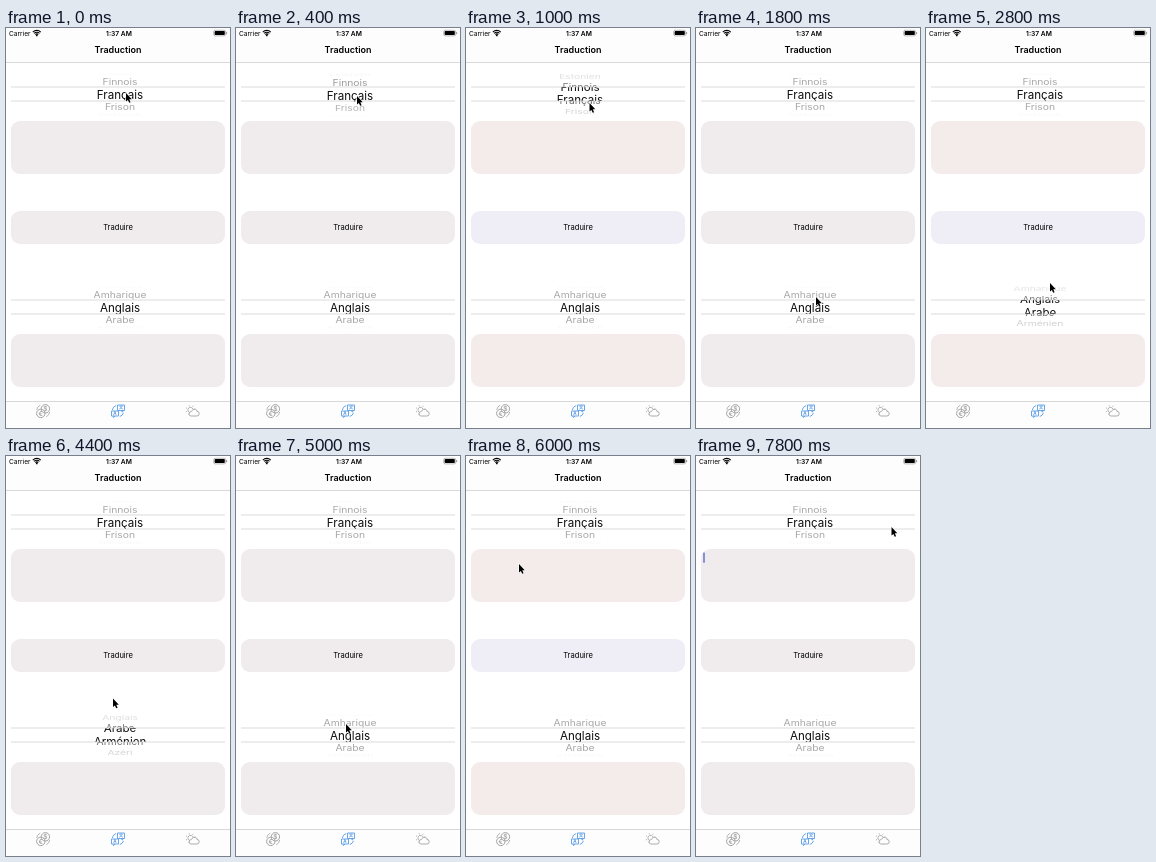
Animation, 224 px wide and 400 px high, one loop 8 s. Source, as an HTML page with a canvas:

```html
<!DOCTYPE html>
<html lang="fr">
<head>
<meta charset="utf-8">
<title>Traduction</title>
<style>
  html, body { margin: 0; width: 100%; height: 100%; overflow: hidden; background: #fff; }
  canvas { display: block; width: 224px; height: 400px; }
</style>
</head>
<body>
<canvas id="stage"></canvas>
<script>
const W = 224, H = 400, LOOP = 8000, STEP = 200;
const canvas = document.getElementById('stage');
const ctx = canvas.getContext('2d');
const dpr = window.devicePixelRatio || 1;
canvas.width = W * dpr;
canvas.height = H * dpr;

const GREY = '#a3a3a5', BLUE = '#5b9de6';
const FROM = ['Espéranto', 'Estonien', 'Finnois', 'Français', 'Frison', 'Gaélique', 'Galicien'];
const TO = ['Albanais', 'Allemand', 'Amharique', 'Anglais', 'Arabe', 'Arménien', 'Azéri', 'Basque'];

// Key points: [time, value, ...]
const MOUSE = [
  [0, 120, 65], [400, 121, 68], [1000, 123.5, 75], [1200, 124, 82], [1800, 120, 269],
  [2200, 122, 273], [2800, 124, 255], [3200, 124, 246], [3600, 116, 270],
  [4400, 107, 242.5], [5000, 110, 268], [5200, 110, 268], [6000, 53, 108],
  [6400, 53, 108], [7400, 195.5, 71], [8000, 195.5, 71]
];
const FROM_POS = [[0, 3], [200, 2.95], [1000, 2.57], [1400, 3], [8000, 3]];
const TO_POS = [
  [0, 3], [2000, 3], [2800, 3.62], [3200, 4], [3600, 4],
  [4400, 4.56], [5000, 3], [8000, 3]
];

function sample(keys, t) {
  let i = 1;
  while (i < keys.length - 1 && t >= keys[i][0]) i++;
  const a = keys[i - 1], b = keys[i];
  const p = Math.min(1, (t - a[0]) / (b[0] - a[0]));
  const e = p * p * (3 - 2 * p);
  return a.slice(1).map((v, k) => v + (b[k + 1] - v) * e);
}

function text(str, x, y, size, { weight = 400, color = '#000', align = 'center' } = {}) {
  ctx.font = `${weight} ${size}px Inter, Roboto, sans-serif`;
  ctx.textAlign = align;
  ctx.textBaseline = 'alphabetic';
  ctx.fillStyle = color;
  ctx.fillText(str, x, y);
}

function rect(x, y, w, h, color) {
  ctx.fillStyle = color;
  ctx.fillRect(x, y, w, h);
}

function box(x, y, w, h, r, color) {
  ctx.beginPath();
  ctx.roundRect(x, y, w, h, r);
  ctx.fillStyle = color;
  ctx.fill();
}

function stroke(color, width, draw) {
  ctx.beginPath();
  draw();
  ctx.strokeStyle = color;
  ctx.lineWidth = width;
  ctx.stroke();
}

function poly(points) {
  points.forEach(([x, y], i) => i ? ctx.lineTo(x, y) : ctx.moveTo(x, y));
}

function clipped(y, h, draw) {
  ctx.save();
  ctx.beginPath();
  ctx.rect(0, y, W, h);
  ctx.clip();
  draw();
  ctx.restore();
}

function rows(items, pos, cy, size, radius, inner) {
  items.forEach((name, i) => {
    const angle = (i - pos) * 0.6;
    if (Math.abs(angle) > 1.3) return;
    const c = Math.cos(angle);
    ctx.save();
    ctx.translate(114, cy + radius * Math.sin(angle));
    ctx.scale(1, c);
    ctx.globalAlpha = inner ? 0.95 : 0.62 * c ** 3;
    text(name, 0, size * 0.36, size);
    ctx.restore();
  });
}

// Dim drum outside the band, enlarged dark copy inside it
function picker(items, pos, cy) {
  const top = cy - 7.5, bottom = cy + 6.5;
  clipped(cy - 21, top - cy + 21, () => rows(items, pos, cy, 10.3, 22, false));
  clipped(bottom, 16, () => rows(items, pos, cy, 10.3, 22, false));
  clipped(top, bottom - top, () => rows(items, pos, cy, 11.6, 23, true));
  for (const y of [top, bottom]) rect(5, y - 0.3, 214, 0.6, '#c3c3c5');
}

function statusBar() {
  text('Carrier', 3, 7.5, 6.6, { align: 'left' });
  text('1:37 AM', 113, 7.5, 6.7, { weight: 600 });
  for (const r of [2, 3.8, 5.6])
    stroke('#000', 1.1, () => ctx.arc(30.8, 8, r, -Math.PI * 0.75, -Math.PI * 0.25));
  ctx.beginPath();
  ctx.arc(30.8, 7.4, 0.9, 0, 7);
  ctx.fillStyle = '#000';
  ctx.fill();
  stroke('#777', 0.5, () => ctx.roundRect(207.7, 2.3, 12, 5.6, 1.5));
  box(208.6, 3.1, 10.2, 4, 0.8, '#000');
  rect(220.3, 4.1, 0.8, 2, '#777');
}

function coinsIcon(x, y) {
  stroke(GREY, 1, () => ctx.arc(x + 2.2, y - 2.2, 4.2, 0, 7));
  stroke(GREY, 1, () => ctx.arc(x - 2.4, y + 2.4, 4.2, 0, 7));
  text('$', x + 2.2, y + 0.2, 6.5, { weight: 600, color: GREY });
  text('€', x - 2.4, y + 4.8, 6.5, { weight: 600, color: GREY });
  stroke(GREY, 0.8, () => {
    ctx.arc(x, y, 6.6, Math.PI * 1.05, Math.PI * 1.35);
    ctx.moveTo(x + 6.6, y + 1);
    ctx.arc(x, y, 6.6, 0.15, Math.PI * 0.35);
  });
}

function translateIcon(x, y) {
  ctx.lineJoin = 'round';
  stroke(BLUE, 0.9, () => {
    ctx.rect(x - 0.5, y - 6, 7, 5.5);
    ctx.rect(x - 6.5, y, 7, 5);
    poly([[x + 3, y - 0.5], [x + 4.5, y + 1.2], [x + 5, y - 0.5]]);
    poly([[x - 5, y + 5], [x - 4.5, y + 6.6], [x - 3, y + 5]]);
  });
  text('A', x - 3, y + 4.3, 4.5, { weight: 700, color: BLUE });
  text('文', x + 3, y - 1.6, 4.5, { weight: 700, color: BLUE });
  stroke(BLUE, 0.9, () => {
    ctx.arc(x, y, 5.8, Math.PI * 1.05, Math.PI * 1.4);
    ctx.moveTo(x + 5.6, y + 2);
    ctx.arc(x, y, 5.8, 0.35, Math.PI * 0.4);
  });
}

function weatherIcon(x, y) {
  stroke(GREY, 0.8, () => {
    ctx.arc(x - 2, y - 1, 2.6, Math.PI * 0.6, Math.PI * 1.9);
    for (let a = 0.6; a < 2; a += 0.27) {
      const c = Math.cos(a * Math.PI), s = Math.sin(a * Math.PI);
      ctx.moveTo(x - 2 + c * 3.8, y - 1 + s * 3.8);
      ctx.lineTo(x - 2 + c * 5, y - 1 + s * 5);
    }
  });
  stroke(GREY, 0.9, () => {
    ctx.moveTo(x - 1.5, y + 5);
    ctx.arc(x - 1.3, y + 2.8, 2.2, Math.PI * 0.55, Math.PI * 1.5);
    ctx.arc(x + 2, y + 0.8, 2.7, Math.PI * 1.1, Math.PI * 1.9);
    ctx.arc(x + 4.4, y + 2.7, 2.3, Math.PI * 1.5, Math.PI * 0.5);
    ctx.closePath();
  });
}

function pointer(x, y) {
  ctx.beginPath();
  poly([[0, 0], [0, 8.6], [1.9, 6.9], [3.2, 9.8], [4.6, 9.2], [3.3, 6.3], [5.8, 6.2]]
    .map(([dx, dy]) => [x + dx, y + dy]));
  ctx.closePath();
  ctx.lineJoin = 'round';
  ctx.strokeStyle = '#fff';
  ctx.lineWidth = 1.2;
  ctx.stroke();
  ctx.fillStyle = '#000';
  ctx.fill();
}

function isWarm(t) {
  return (t >= 600 && t < 1400) || (t >= 2400 && t < 3600) || (t >= 5200 && t < 6600);
}

function draw(t) {
  const warm = isWarm(t);
  const field = warm ? '#f3eceb' : '#f0eced';

  ctx.setTransform(dpr, 0, 0, dpr, 0, 0);
  rect(0, 0, W, H, '#fff');
  rect(0, 0, W, 34, '#fdfdfd');
  rect(0, 34, W, 0.7, '#c9c9cb');
  statusBar();
  text('Traduction', 112, 25.4, 9, { weight: 600 });

  picker(FROM, sample(FROM_POS, t)[0], 66.5);
  box(5, 93, 214, 53, 9, field);
  box(5, 183, 214, 33, 9, warm ? '#efeef6' : field);
  text('Traduire', 112, 202.3, 7.6);
  picker(TO, sample(TO_POS, t)[0], 279.5);
  box(5, 306, 214, 53, 9, field);

  rect(0, 373, W, 27, '#fdfdfd');
  rect(0, 373, W, 0.7, '#c9c9cb');
  coinsIcon(37.2, 383);
  translateIcon(112, 383);
  weatherIcon(186.5, 383);

  if (t >= 6400 && t % 800 !== 400) box(7.3, 96.5, 1.4, 10.3, 0.6, '#5767d6');
  pointer(...sample(MOUSE, t));
}

const start = performance.now();
function tick() {
  const t = (performance.now() - start) % LOOP;
  draw(Math.floor(t / STEP) * STEP);
  requestAnimationFrame(tick);
}
tick();
</script>
</body>
</html>
```
